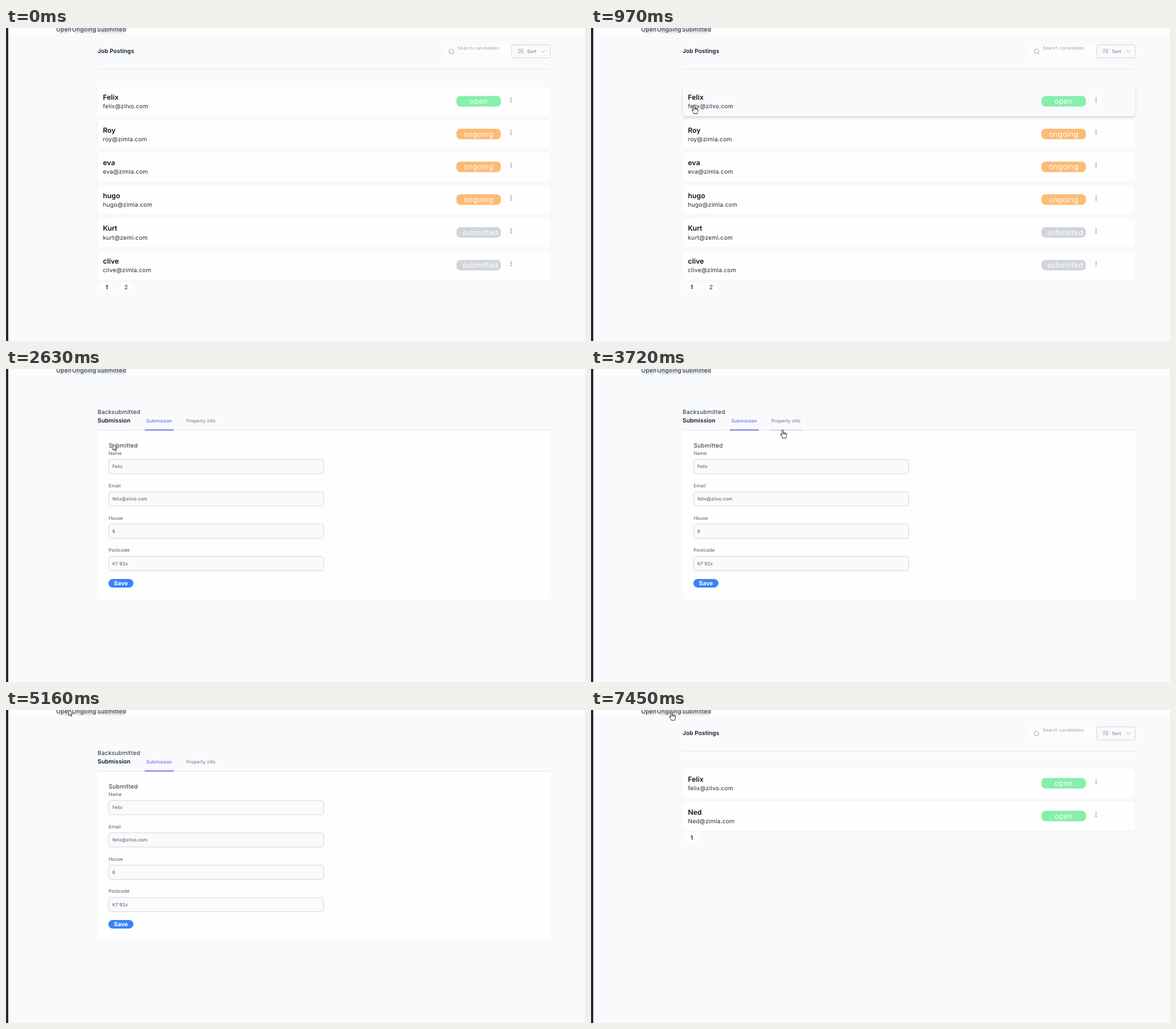
Animation of 1018 by 550 pixels, one loop 8000 ms. Source, as an HTML page:

```html
<!DOCTYPE html>
<html lang="en">
<head>
<meta charset="utf-8">
<title>Job postings</title>
<style>
  html, body { margin: 0; width: 100%; height: 100%; overflow: hidden; background: #fefefe; }
  svg { display: block; width: 1018px; height: 550px; }
  text { font-family: Inter, "Open Sans", sans-serif; fill: #1f2937; white-space: pre; text-rendering: geometricPrecision; }
  .base { font-size: 10.2px; letter-spacing: .025em; }
  .small { font-size: 8.1px; letter-spacing: .013em; fill: #4b5563; }
  .bold { font-size: 10.2px; font-weight: 600; letter-spacing: .005em; fill: #111827; }
  .name { font-size: 12.2px; font-weight: 600; letter-spacing: .005em; fill: #111; }
  .badge { font-size: 12.75px; letter-spacing: .033em; fill: #fff; text-anchor: middle; }
  .mid { text-anchor: middle; }
  .card > .back { fill: #fefefe; filter: drop-shadow(0 .6px .8px rgba(0, 0, 0, .07)); }
  .card > .spot { fill: none; }
  .card.hover > .back { fill: #f9fafb; filter: drop-shadow(0 2px 2px rgba(0, 0, 0, .16)); }
  .card.hover > .spot { fill: #fefefe; }
  .line { fill: none; stroke: #9ca3af; stroke-width: 1; stroke-linecap: round; stroke-linejoin: round; }
  .pointer { fill: #fff; stroke: #111; stroke-width: .9; stroke-linejoin: round; }
</style>
</head>
<body>
<svg id="stage" viewBox="0 0 1018 550"></svg>
<script>
const LOOP = 8000;
const DARK = '#1f2937', PALE = '#f9fafb', WHITE = '#fefefe', RULE = '#e5e7eb', EDGE = '#d1d5db';
const BADGES = { open: '#86efac', ongoing: '#fdba74', submitted: '#d1d5db' };
const CARD = { x: 161, y: 103, w: 796, h: 52, pitch: 57.6 };

const people = [
  ['Felix', 'felix@zilvo.com', 'open'],
  ['Roy', 'roy@zimla.com', 'ongoing'],
  ['eva', 'eva@zimla.com', 'ongoing'],
  ['hugo', 'hugo@zimla.com', 'ongoing'],
  ['Kurt', 'kurt@zemi.com', 'submitted'],
  ['clive', 'clive@zimla.com', 'submitted']
];
const openPeople = [people[0], ['Ned', 'Ned@zimla.com', 'open']];
const fields = [['Name', 'Felix'], ['Email', 'felix@zilvo.com'], ['House', '6'], ['Postcode', 'K7 92x']];

// Page shown from each time on
const pages = [[0, 'list'], [1790, 'loading'], [2630, 'form'], [5400, 'reload'], [6850, 'open']];
// Spans in which the pointer stays an arrow
const busy = [[1360, 2630], [5160, 5400]];
// Pointer tip: time, x, y
const path = [
  [140, 983, 540], [300, 770, 425], [500, 430, 250], [650, 235, 150], [760, 169, 117],
  [900, 178, 137], [970, 181, 136], [1130, 188, 132], [3310, 188, 132],
  [3450, 225, 129], [3600, 305, 114], [3720, 337, 107], [3800, 330, 92], [3950, 240, 40],
  [4090, 174, 10.5], [4120, 172, 8], [4350, 125, 5], [4550, 106, 3], [4920, 110, -1],
  [5400, 110, -1], [5700, 128, 1], [5920, 136, 2], [6850, 136, 2], [7050, 137, 3],
  [7190, 137, 3], [7450, 141.5, 3.5]
];

const rect = (x, y, w, h, fill, rx = 0, more = '') =>
  `<rect x="${x}" y="${y}" width="${w}" height="${h}" rx="${rx}" fill="${fill}" ${more}/>`;
const text = (x, y, cls, s, more = '') => `<text x="${x}" y="${y}" class="${cls}" ${more}>${s}</text>`;
const line = (d, more = '') => `<path class="line" d="${d}" ${more}/>`;

function nav(dx) {
  const items = [['Open', 88.3, 27], ['Ongoing', 116, 43.5], ['Submitted', 160, 52]];
  return rect(4, 0, 1014, 10, WHITE) + items.map(([s, x, w]) =>
    rect(x + dx, -5, w, 14.5, RULE, 7) + text(x + dx, 5.6, 'base', s)).join('');
}

function header(dx) {
  return text(161, 44.3, 'bold', 'Job Postings')
    + rect(770 + dx, 29.5, 119, 23.5, '#fbfcfd', 4)
    + rect(793 + dx, 29.5, 95, 12, WHITE)
    + `<g transform="translate(${dx})">`
    + line('M786.3 44.3L788 46M787 41a4 4 0 1 1-8 0a4 4 0 1 1 8 0')
    + text(794, 38.3, 'small', 'Search candidates', 'style="fill:#9ca3af"')
    + rect(889, 29.5, 68, 23, PALE, 3, `stroke="${EDGE}"`)
    + line('M900.5 37.5h9M900.5 40.5h5M900.5 43.5h3.5M907.5 45v-5M905.5 42l2-2 2 2')
    + text(916, 44, 'small', 'Sort', 'style="fill:#6b7280"')
    + line('M941.5 39.8l3 3 3-3')
    + '</g>'
    + rect(161, 72, 796 + dx, 1, RULE);
}

function card([name, mail, state], i) {
  const dots = [122.6, 126, 129.4].map(y => `<circle cx="888" cy="${y}" r=".95" fill="#6b7280"/>`).join('');
  return `<g class="card" transform="translate(0 ${i * CARD.pitch})">`
    + rect(CARD.x, CARD.y, CARD.w, CARD.h, WHITE, 5, 'class="back"')
    + '<circle class="spot" cx="888" cy="126" r="10.5"/>'
    + text(170.5, 126, 'name', name) + text(170.5, 141.2, 'base', mail)
    + rect(792, 119.5, 78, 18.5, BADGES[state], 7)
    + text(state === 'submitted' ? 834 : 831, 133.3, 'badge', state)
    + dots + '</g>';
}

function list(rows, count) {
  const y = 109.5 + rows.length * CARD.pitch;
  let out = rect(4, 10, 1014, 540, PALE) + nav(0) + header(0) + rows.map(card).join('');
  for (let i = 0; i < count; i++) {
    const x = 177.3 + i * 34;
    out += rect(x - 11.5, y - 7, 23, 14, WHITE, 6)
      + text(x, y + 3.7, (i ? 'base' : 'bold') + ' mid', i + 1);
  }
  return out + rect(0, 0, 4, 550, DARK);
}

function loading(y, withHeader) {
  return (withHeader ? rect(4, 10, 1014, 63, PALE) + header(10.5) : '') + nav(5.3)
    + text(4, y - 4.4, 'base', 'Loading...')
    + rect(0, y, 1018, 14.7, DARK) + text(4, y + 10.4, 'base', 'this is a footer', 'style="fill:#0b0f16"')
    + rect(0, 0, 4, y + 14.7, DARK);
}

function form() {
  const inputs = fields.map(([label, value], i) => {
    const y = 159 + i * 56.8;
    return text(180.5, y - 8, 'small', label)
      + rect(180.5, y, 378, 25, PALE, 4, `stroke="${EDGE}"`)
      + text(187, y + 15.4, 'small', value);
  }).join('');
  return rect(4, 10, 1014, 540, PALE) + nav(0)
    + text(161, 79.4, 'base', 'Backsubmitted') + text(161, 94.2, 'bold', 'Submission')
    + rect(161, 108, 796, 296, WHITE, 5) + rect(161, 107, 796, 1, RULE)
    + text(246.8, 94.2, 'small', 'Submission', 'style="fill:#5b50e8"')
    + rect(244, 106.4, 51, 1.5, '#5b50e8')
    + text(317, 94.2, 'small', 'Property info', 'style="fill:#6b7280"')
    + rect(314, 106.6, 57, 1.3, '#c3c8d0', 0, 'id="tabLine"')
    + text(180.5, 138, 'base', 'Submitted') + inputs
    + rect(180, 369, 44, 15, '#3b82f6', 7.5)
    + text(202, 380.2, 'bold mid', 'Save', 'style="fill:#fff;font-weight:700"')
    + rect(0, 0, 4, 550, DARK);
}

const views = {
  list: list(people, 2),
  loading: loading(24.5, false),
  form: form(),
  reload: loading(87.7, true),
  open: list(openPeople, 1)
};

const stage = document.getElementById('stage');
stage.innerHTML = rect(0, 0, 1018, 550, WHITE)
  + Object.entries(views).map(([id, body]) => `<g id="${id}">${body}</g>`).join('')
  + '<g id="cursor">'
  + '<path id="arrow" class="pointer" d="M0 0V10.8L2.5 8.5 4.1 12.1 5.8 11.4 4.2 7.8H7.5Z"/>'
  + '<path id="hand" class="pointer" d="M-1.3 9.2V1.2Q-1.2 0 0 0 1.2 0 1.2 1.2V5.2Q2.4 4.4 3.3 5.6 4.6 5 5.2 6.2 7 5.8 7 7.6V10.4Q7 12 5.8 13V14.6H-.4V13.2L-3.6 9.2Q-4.2 7.8-3 7.5-2.2 7.5-1.3 9.2ZM1.2 5.2V8M3.3 5.6V8M5.2 6.2V8.2"/>'
  + '</g>';

const el = id => document.getElementById(id);
const show = (node, on) => { node.style.display = on ? '' : 'none'; };
const cards = {};
for (const id in views) cards[id] = [...el(id).querySelectorAll('.card')];

function pointAt(t) {
  const i = path.findIndex(p => p[0] > t);
  if (i < 0) return path[path.length - 1].slice(1);
  if (i === 0) return path[0].slice(1);
  const [t0, x0, y0] = path[i - 1], [t1, x1, y1] = path[i];
  const k = (t - t0) / (t1 - t0);
  return [x0 + (x1 - x0) * k, y0 + (y1 - y0) * k];
}

function draw(t) {
  const page = pages.filter(p => p[0] <= t).pop()[1];
  for (const id in views) show(el(id), id === page);

  const visible = t >= path[0][0];
  const [x, y] = pointAt(t);
  const row = Math.floor((y - CARD.y) / CARD.pitch);
  const inCard = visible && x > CARD.x && x < CARD.x + CARD.w && y - CARD.y - row * CARD.pitch < CARD.h;
  let over = false;
  cards[page].forEach((c, i) => {
    const on = inCard && i === row;
    c.classList.toggle('hover', on);
    over = over || on;
  });
  const onTab = page === 'form' && x > 314 && x < 371 && y > 80 && y < 109;
  show(el('tabLine'), onTab);

  const onNav = y < 10 && x > 88 && x < 217;
  const waiting = busy.some(([a, b]) => t >= a && t < b);
  const hand = !waiting && (over || onTab || onNav);
  show(el('cursor'), visible);
  show(el('hand'), hand);
  show(el('arrow'), !hand);
  el('cursor').setAttribute('transform', `translate(${x} ${y})`);
}

const start = performance.now();
function tick() {
  draw((performance.now() - start) % LOOP);
  requestAnimationFrame(tick);
}
tick();
</script>
</body>
</html>
```
